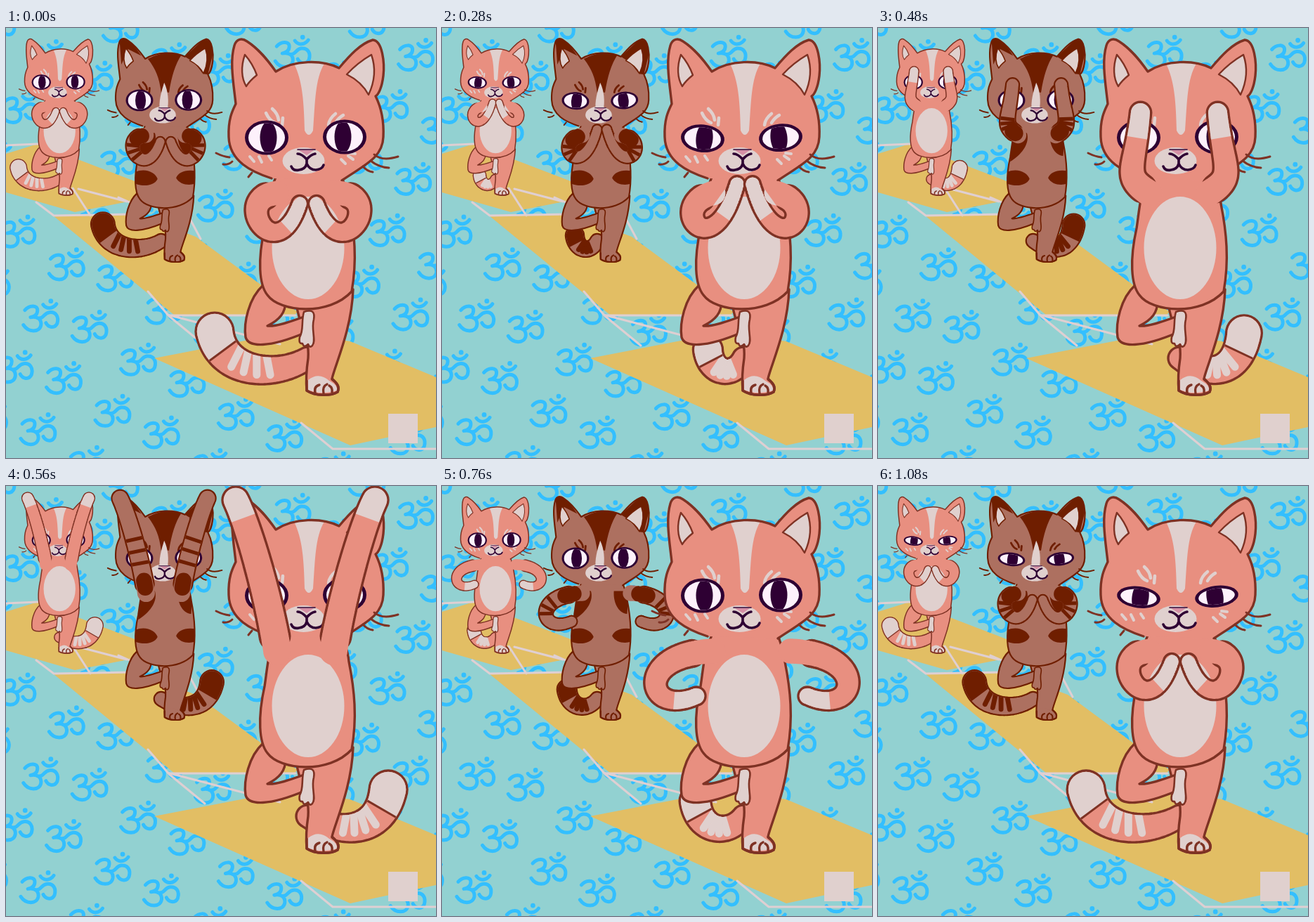
An HTML page with a canvas for the animation above (1120 ms loop, 612 px wide and 612 px high).

```html
<!DOCTYPE html>
<html lang="en">
<head>
<meta charset="utf-8">
<title>Yoga cats</title>
<style>
html, body { margin: 0; width: 100%; height: 100%; overflow: hidden; background: #92d1d1; }
canvas { display: block; width: 612px; height: 612px; }
</style>
</head>
<body>
<canvas id="stage" width="612" height="612"></canvas>
<script>
const ctx = document.getElementById('stage').getContext('2d');
const LOOP = 1120, STEP = 40;
const CREAM = '#e0d0ce', INK = '#2e0033', WHITE = '#fdf1fb';

const ginger = { fur: '#e88f80', line: '#7e3224', mark: CREAM, paw: CREAM };
const brown = { fur: '#ad7060', line: '#6f1e00', mark: '#6f1e00', paw: '#ad7060', dark: true };
const cats = [
  { coat: ginger, x: -113, y: 8.5, scale: 0.44, tailShift: 0 },
  { coat: brown, x: -43, y: 5, scale: 0.628, tailShift: -9 },
  { coat: ginger, x: 0, y: 0, scale: 1, tailShift: 0 }
];

const lerp = (a, b, k) => a + (b - a) * k;
const clamp = v => Math.min(1, Math.max(0, v));
const smooth = k => k * k * (3 - 2 * k);
const pulse = (t, center, width) => clamp(1.6 * (1 - Math.abs(t - center) / width));

// Left arm poses; the right arm mirrors them about the axis
const pray = { axis: 430, x: 418, y: 250, elbowX: 364, elbowY: 281, curl: 50, hand: 11.5 };
const press = { ...pray, axis: 431, x: 420, y: 221 };
const reach = { axis: 426, x: 327, y: 20, elbowX: 360, elbowY: 117, curl: 0, hand: 19 };
const low = { axis: 441, x: 362, y: 299, elbowX: 304, elbowY: 280, curl: 30, hand: 13 };
const routine = [[0, pray], [320, press], [400, press], [560, reach], [760, low], [920, pray], [LOOP, pray]];

function armPose(t) {
  const i = routine.findIndex(stop => t < stop[0]);
  const [t0, a] = routine[i - 1], [t1, b] = routine[i];
  const k = smooth((t - t0) / (t1 - t0)), pose = {};
  for (const key in a) pose[key] = lerp(a[key], b[key], k);
  // the arms swing wide on the way down
  if (b === low) {
    pose.x -= 85 * Math.sin(Math.PI * k);
    pose.elbowX -= 25 * Math.sin(Math.PI * k);
  }
  return pose;
}

// Cubic from the shoulder that passes through the elbow halfway
function armCurve(p) {
  const sx = 386, sy = 235;
  const mx = (8 * p.elbowX - sx - p.x) / 6, my = (8 * p.elbowY - sy - p.y) / 6;
  const dx = (p.x - sx) / 4 + p.curl / 2, dy = (p.y - sy) / 4 + p.curl;
  return [sx, sy, mx - dx, my - dy, mx + dx, my + dy, p.x, p.y];
}

// -1 is far left, 1 is far right
function tailSwing(t) {
  const right = 560, left = 1020;
  if (t >= right && t < left) return Math.cos(Math.PI * Math.sqrt((t - right) / (left - right)));
  const k = ((t - left + LOOP) % LOOP) / (LOOP - left + right);
  return -Math.cos(Math.PI * k ** 1.7);
}

function tailCurve(s) {
  const x = 420 + 124 * s, lift = 52 * Math.sin(Math.abs(s) * Math.PI / 2);
  return [429, 470, 432 + 48 * s, 499, x - 10 * s, 493, x, 484 - lift];
}

const eyeOpen = t => 1 - pulse(t, 160, 140) - 0.45 * pulse(t, 1080, 60);

function shape(d, fill, line, width = 3.4) {
  const p = new Path2D(d);
  if (fill) { ctx.fillStyle = fill; ctx.fill(p); }
  if (line) { ctx.strokeStyle = line; ctx.lineWidth = width; ctx.stroke(p); }
}

function oval(x, y, rx, ry, fill) {
  ctx.beginPath();
  ctx.ellipse(x, y, rx, ry, 0, 0, 7);
  ctx.fillStyle = fill;
  ctx.fill();
}

function bar(x0, y0, x1, y1, color, width) {
  ctx.beginPath();
  ctx.moveTo(x0, y0);
  ctx.lineTo(x1, y1);
  ctx.strokeStyle = color;
  ctx.lineWidth = width;
  ctx.stroke();
}

function curveAt(c, u) {
  const v = 1 - u;
  const at = k => v * v * v * c[k] + 3 * v * v * u * c[k + 2] + 3 * v * u * u * c[k + 4] + u * u * u * c[k + 6];
  const slope = k => v * v * (c[k + 2] - c[k]) + 2 * v * u * (c[k + 4] - c[k + 2]) + u * u * (c[k + 6] - c[k + 4]);
  return { x: at(0), y: at(1), angle: Math.atan2(slope(1), slope(0)) };
}

// A tapered tube: round stamps along a curve
function tube(c, r0, r1, from, to, grow) {
  const p = new Path2D();
  for (let i = 0; i <= 70; i++) {
    const u = lerp(from, to, i / 70), q = curveAt(c, u), r = lerp(r0, r1, u) + grow;
    p.moveTo(q.x + r, q.y);
    p.arc(q.x, q.y, r, 0, 7);
  }
  return p;
}

function at(c, u, draw) {
  const q = curveAt(c, u);
  ctx.save();
  ctx.translate(q.x, q.y);
  ctx.rotate(q.angle);
  draw();
  ctx.restore();
}

function limb(c, r0, r1, coat, openFrom, paint) {
  ctx.fillStyle = coat.line;
  ctx.fill(tube(c, r0, r1, openFrom, 1, 1.7));
  const inside = tube(c, r0, r1, 0, 1, -1.7);
  ctx.fillStyle = coat.fur;
  ctx.fill(inside);
  ctx.save();
  ctx.clip(inside);
  paint();
  ctx.restore();
}

function drawTail(coat, t) {
  const s = tailSwing(t), c = tailCurve(s), side = -Math.sign(s);
  const tip = 18 + 9 * Math.abs(s);
  limb(c, 16, tip, coat, 0, () => {
    for (let i = 0; i < 4; i++) {
      const u = 0.37 + 0.11 * i, r = lerp(16, tip, u);
      at(c, u, () => bar(0, side * r, -5, -side * r * 0.35, coat.mark, 11));
    }
    at(c, 0.82, () => {
      ctx.fillStyle = coat.mark;
      ctx.fillRect(0, -34, 70, 68);
      bar(0, -34, 0, 34, coat.line, 3);
    });
  });
}

function drawArm(coat, c, hand) {
  limb(c, 15 + hand * 0.35, hand, coat, 0.1, () => {
    if (coat.dark) {
      ctx.fillStyle = coat.mark;
      ctx.fill(tube(c, 18, 18, 0.06, 0.13, 0));
      for (let u = 0.3; u < 0.55; u += 0.11) at(c, u, () => bar(0, -20, -2, 20, coat.mark, 8));
    } else {
      at(c, 0.83, () => {
        ctx.fillStyle = coat.paw;
        ctx.fillRect(0, -20, 75, 40);
      });
    }
  });
}

function drawArms(coat, t) {
  const pose = armPose(t), left = armCurve(pose);
  const right = left.map((v, i) => i % 2 ? v : 2 * pose.axis - v);
  drawArm(coat, left, pose.hand);
  drawArm(coat, right, pose.hand);
}

function drawLegs(coat) {
  const { fur, line, paw } = coat;
  shape('M414 398C420 430 432 440 430 470C427 490 427 505 428 516C440 524 462 524 472 518C476 510 470 505 464 499C468 480 492 430 494 372Z', fur, line);
  shape('M430 501Q445 489 460 502Q473 509 471 516Q450 523 430 515Z', paw);
  shape('M428 502V516C440 524 462 524 472 518Q476 508 464 500M440 519Q438 510 446 508M452 520Q450 510 457 507M464 518Q465 512 460 509', null, line);
  shape('M366 366C345 385 338 420 341 440C345 455 375 455 425 434L424 411C405 418 385 425 372 424C390 415 398 405 398 388Z', fur, line);
  shape('M424 404C436 400 440 404 438 415C434 430 442 445 436 452Q432 456 430 450Q424 456 422 449Q416 450 418 440C424 430 420 418 424 404Z', paw, line, 2.6);
}

function drawBody(coat) {
  const outline = 'M384 212C372 240 372 260 368 285C358 330 360 365 372 380C390 405 460 410 492 375C500 330 496 290 488 250C487 235 482 225 478 212';
  shape(outline, coat.fur);
  if (coat.dark) {
    ctx.save();
    ctx.clip(new Path2D(outline));
    shape('M372 228L406 230C412 250 400 275 368 295ZM458 230L492 230L488 282C468 280 456 255 458 230Z', coat.mark);
    shape('M362 318C385 308 408 320 412 334C405 350 380 352 362 345ZM498 316C475 312 458 320 454 332C462 346 480 350 498 345Z', coat.mark);
    ctx.restore();
  } else {
    oval(430, 313, 51.5, 73, CREAM);
  }
  shape(outline, null, coat.line);
}

function drawEye(x, y, side, open) {
  if (open < 0.08) {
    ctx.lineCap = 'butt';
    bar(x - 30, y + 3.5, x + 31, y + 3.5, INK, 8);
    ctx.lineCap = 'round';
    return;
  }
  const ry = 4 + 20.5 * open;
  ctx.save();
  ctx.translate(x, y + 5 * (1 - open));
  ctx.rotate(side * 0.5 * open * (1 - open));
  oval(0, 0, 31, ry, INK);
  oval(0, 0, 26, Math.max(ry - 4, 1), WHITE);
  ctx.clip();
  oval(side * 2.5, 0, 12, 23, INK);
  ctx.restore();
}

function drawHead(coat, open) {
  const { fur, line, mark, dark } = coat;
  const outline = 'M378 214C350 205 318 190 317 155C316 130 322 118 327 108C324 80 318 48 325 25C328 15 336 14 343 19C360 30 372 45 384 62C410 45 450 45 474 57C490 38 505 22 522 17C536 18 539 50 537 68C535 85 530 95 526 97C535 115 538 135 537 155C536 185 510 195 478 217';
  shape(outline, fur);
  if (dark) {
    ctx.save();
    ctx.clip(new Path2D(outline));
    shape('M325 10L350 20L375 55L345 40L330 75ZM474 57L522 12L545 20L526 97L515 96L495 70Z', mark);
    shape('M390 62Q432 40 466 53C452 75 444 100 438 138L420 138C416 105 408 85 390 62Z', mark);
    ctx.restore();
    shape('M427 116C436 135 438 158 434 180H417C414 160 420 138 427 116Z', CREAM);
  } else {
    shape('M410 51Q432 46 453 51C440 72 440 105 437 146Q431 158 425 146C424 105 422 75 410 51Z', CREAM);
  }
  shape('M340 38C334 55 335 72 342 83C346 76 352 71 357 67C353 56 347 46 340 38Z', CREAM, line, 2.4);
  shape('M520 38C527 58 524 78 516 95C508 80 497 72 485 66C496 54 508 45 520 38Z', CREAM, line, 2.4);
  shape(outline, null, line);
  shape('M318 184Q309 183 299 178M322 190Q317 195 309 194M350 206L345 212M524 180Q535 190 558 183M519 189Q530 198 545 199M508 197Q514 204 522 205', null, line, 3);
  shape('M370 121Q375 132 383 135M379 115Q387 122 388 131M394 128L393 138M480 124Q473 128 469 135M469 122Q460 129 459 138', null, mark, 4.5);
  if (!dark) {
    shape('M347 183L353 190M360 183L364 191M374 182L378 188M477 187L483 193M487 182L494 187M489 178L497 179', null, CREAM, 4);
  }
  drawEye(371, 156, 1, open);
  drawEye(482, 155, -1, open);
  oval(423.5, 189, 30, 19, CREAM);
  shape('M417 174H438L428 181Z', '#d58fa6');
  shape('M415 173H440', null, INK, 1.6);
  shape('M415 179Q421 179 428 187Q434 180 440 179M428 186V194M406 197Q409 204 417 202Q426 201 428 193Q432 202 441 202Q450 201 452 195', null, INK, 3.6);
}

function drawCat({ coat, x, y, scale, tailShift }, t) {
  ctx.save();
  ctx.translate(x, y);
  ctx.scale(scale, scale);
  ctx.save();
  ctx.translate(tailShift, -tailShift / 2);
  drawTail(coat, t);
  ctx.restore();
  drawLegs(coat);
  drawBody(coat);
  drawHead(coat, eyeOpen(t));
  drawArms(coat, t);
  ctx.restore();
}

function drawOm(x, y) {
  ctx.save();
  ctx.translate(x, y);
  shape('M-23 -8C-17 -15 -5 -16 -5 -8C-5 -2 -9 1 -15 2C-5 0 1 5 0 13C-2 24 -18 24 -25 13M-5 3C4 5 4 -4 12 -5C21 -6 26 1 23 11C19 19 10 16 7 10M3 -16C8 -9 17 -10 22 -17', null, '#33bfff', 5);
  oval(14, -21, 3.4, 3.4, '#33bfff');
  ctx.restore();
}

function drawFloor() {
  ctx.fillStyle = '#92d1d1';
  ctx.fillRect(0, 0, 612, 612);
  // slanted rows, every other one dropped a little; the leftmost sit lower
  for (let row = -2; row < 12; row++) {
    const x = 17 + 69.4 * row;
    const y = 273 + 38.7 * row + (row % 2 ? 10 : 2) + (row < 2 ? 15 : 0);
    for (let i = -6; i < 11; i++) drawOm(x + 36.6 * i, y - 73 * i);
  }
  shape('M0 179L45 165L230 236L98 262L0 234ZM67 267L182 264L270 297L415 404L410 409H240ZM211 470L345 444L400 432L490 446L612 497V568L490 594Z', '#e2be64');
  shape('M0 167L45 165M95 228L120 267M103 229L172 247M160 241L185 252M43 248L68 267L180 265M262 272L277 300M202 375L232 410L283 452M230 408L390 450M232 409H412M420 562L465 599H612', null, '#dfcfd2', 3);
}

function render(ms) {
  const t = ms < 2 * STEP ? 0 : Math.floor(ms / STEP) * STEP;
  ctx.lineCap = ctx.lineJoin = 'round';
  drawFloor();
  cats.forEach(cat => drawCat(cat, t));
  ctx.fillStyle = CREAM;
  ctx.fillRect(544, 549, 42, 42);
}

const start = performance.now();
function tick() {
  render((performance.now() - start) % LOOP);
  requestAnimationFrame(tick);
}
tick();
</script>
</body>
</html>
```
